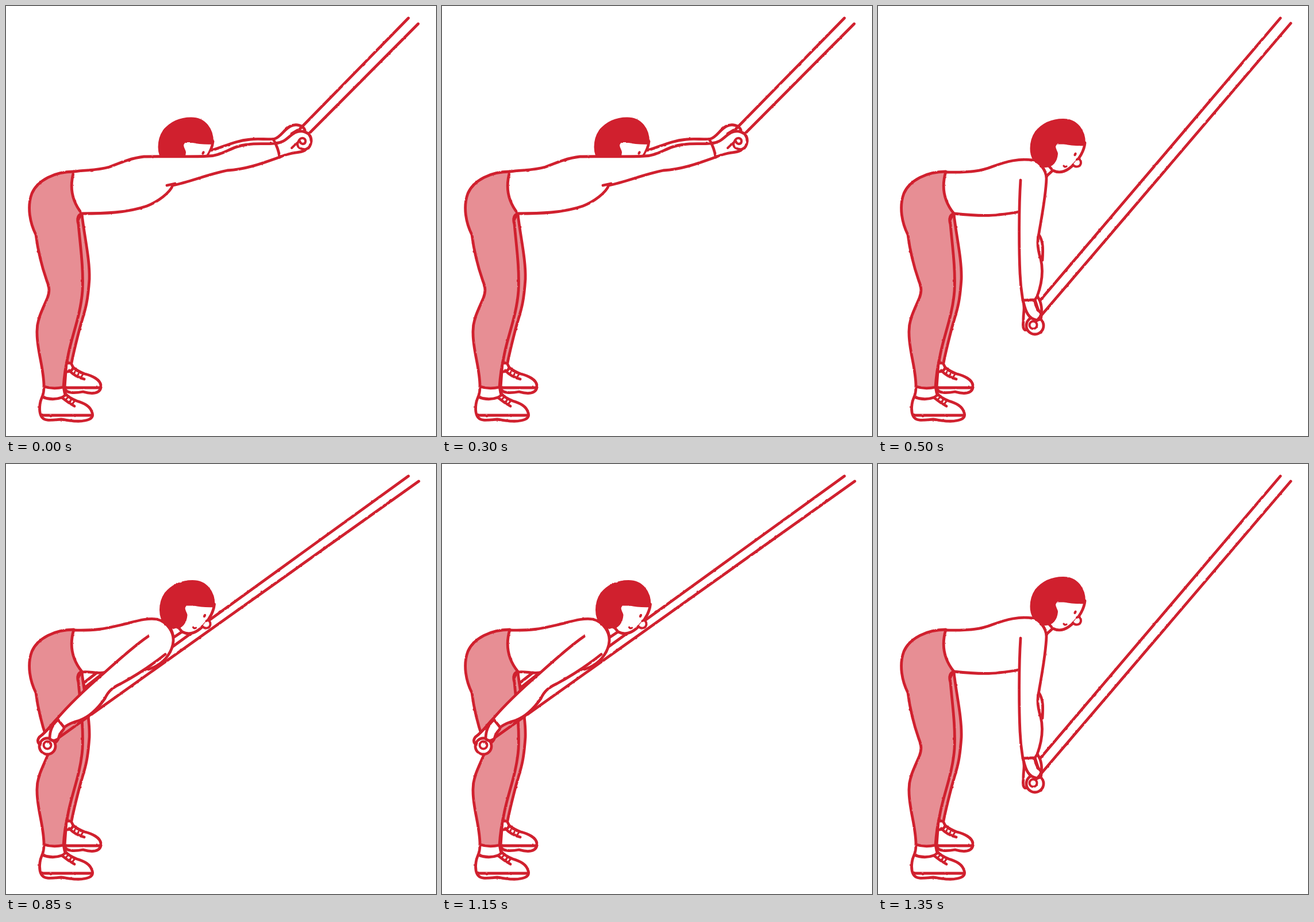
These frames come from a looping animation (748x748 px, 1.7 s). An HTML page:

```html
<!DOCTYPE html>
<html lang="en">
<head>
<meta charset="utf-8">
<title>Straight-arm cable pull</title>
<style>
  html, body { margin: 0; width: 100%; height: 100%; overflow: hidden; background: #fff; }
  svg { display: block; width: 100vw; height: 100vh; }
  .ink { fill: none; stroke: #d0202e; stroke-width: 4.8; stroke-linecap: round; stroke-linejoin: round; }
  .white { fill: #fff; }
  .pink { fill: #e78e94; }
  .red { fill: #d0202e; }
  .thin { stroke-width: 3.2; }
  .fine { stroke-width: 4; }
  .pose { visibility: hidden; }
  .pose.on { visibility: visible; }
</style>
</head>
<body>
<svg viewBox="0 0 748 748">
  <defs>
    <!-- slightly uneven, hand-inked edges -->
    <filter id="rough" filterUnits="userSpaceOnUse" x="0" y="0" width="748" height="748" color-interpolation-filters="sRGB">
      <feTurbulence type="fractalNoise" baseFrequency=".12" numOctaves="2" seed="4"/>
      <feDisplacementMap in="SourceGraphic" scale="2" xChannelSelector="R" yChannelSelector="G"/>
    </filter>
    <g id="head">
      <path class="white" d="M360 238C358 258 342 276 332 283C322 290 312 290 304 286L290 270L310 238Z"/>
      <path class="red" stroke-width="2" d="M275 272C262 262 263 235 274 219C288 202 306 197 322 197C346 197 361 216 360 242Q340 243 323 239C319 232 309 235 308 244C308 250 312 253 312 257C311 270 304 280 291 280C284 280 278 276 275 272Z"/>
      <path class="white fine" d="M346 267C350 264 353 268 353 273C352 281 342 281 339 276"/>
      <path class="thin" d="M323 278Q325 281 328 279"/>
      <ellipse class="red" cx="343" cy="258" rx="1.2" ry="2.4" stroke-width="2" transform="rotate(25 343 258)"/>
    </g>
  </defs>

  <g class="ink" filter="url(#rough)">
    <g id="legs">
      <path class="white" d="M105 622L104 636L102 664C103 675 122 673 134 671C148 675 166 676 165 660C164 650 150 643 137 640Q126 636 117 629L113 621"/>
      <path d="M102 664H165M104 636Q114 637 117 629M110 634Q120 645 136 649"/>
      <path class="thin" d="M118 640L122 633M124 644L128 636M130 647L134 640"/>
      <path class="pink" d="M132 362C136 400 146 440 145 475C142 520 137 530 129 558C122 585 118 600 114 621L106 621L118 500L126 370Z"/>
      <path class="white" d="M66 662Q66 672 63 680C58 690 57 705 61 713C66 724 82 720 96 719C112 721 124 724 138 721C149 719 152 714 150 708C147 696 136 691 123 687Q108 681 102 673L100 662"/>
      <path d="M61 712H150M63 680Q80 687 97 681Q104 678 103 673M97 681Q108 690 119 696"/>
      <path class="thin" d="M103 686L109 679M109 690L115 683M115 693L120 686"/>
      <path class="pink" d="M118 288C85 288 55 303 45 326C36 350 42 378 52 398C56 430 63 455 71 478C76 490 76 497 72 508C60 535 53 548 54 570C54 600 66 630 66 662Q82 667 100 663C101 645 104 625 108 608C114 575 130 538 133 495C135 455 129 415 126 380C123 370 125 363 132 361C115 340 110 315 118 288Z"/>
    </g>

    <g class="pose">
      <use href="#head" y="-2.5"/>
      <path class="white" d="M357 251C380 245 395 235 425 232C440 230 455 233 467 231C478 228 483 215 495 209C505 204 517 208 520 216L500 240L420 250L352 261Z" stroke="none"/>
      <path d="M357 251C380 245 395 235 425 232C440 230 455 233 467 231C478 228 483 215 495 209C505 204 517 208 520 216M497 222L507 216"/>
      <path d="M700 21L511 214M717 31L524 225"/>
      <path class="white" d="M468 239C485 238 490 228 500 222C512 214 531 218 531 235C530 244 526 248 522 249C518 255 505 254 494 257Q484 259 476 263"/>
      <path class="fine" d="M522 249C514 250 504 246 508 237C510 231 514 229 517 230C523 232 522 240 516 240Q512 239 511 235M508 237Q503 241 497 247"/>
      <path class="white" d="M118 288C140 285 160 286 180 280C200 272 220 264 240 262C270 261 320 263 352 261C380 260 390 244 420 241C440 238 455 241 468 239L466 234Q474 248 476 263C450 272 420 284 385 286C350 293 320 306 290 312C285 325 265 340 245 348C210 360 170 361 132 361"/>
      <path d="M280 312L294 309"/>
    </g>

    <g class="pose">
      <path d="M700 21L277 518"/>
      <use href="#head"/>
      <path d="M285 279Q291 287 292 297L303 287M280 398C288 410 287 425 286 442"/>
      <path class="white" d="M277 505C285 515 286 530 283 542L273 511"/>
      <path class="white" d="M252 512C257 525 252 533 253 548C251 560 254 567 261 562L275 546L273 511Z"/>
      <circle class="white" cx="273" cy="556" r="15"/>
      <path class="white" d="M253 515C257 532 262 544 275 546C285 548 287 538 279 529Q273 521 273 511"/>
      <path d="M718 30L274 550"/>
      <circle class="white fine" cx="270" cy="555" r="6.5"/>
      <path class="white" d="M118 289C160 290 180 287 200 279C225 270 245 265 268 268C280 270 293 285 293 300C292 330 285 365 280 395C276 410 278 425 283 440C288 460 286 480 277 505L273 511L252 512C250 500 248 490 247 465C245 420 245 350 248 303"/>
      <path d="M132 361C160 364 190 366 210 363Q230 361 245 358"/>
    </g>

    <g class="pose">
      <path d="M700 21L255 343M718 30L75 488M135 381L158 363M137 389L170 363"/>
      <path d="M132 362C145 360 155 365 170 363"/>
      <use href="#head" x="2.5" y="6"/>
      <path d="M285 284Q290 292 291 302L306 292"/>
      <path class="white" d="M89 443C78 454 72 465 58 475C53 482 56 490 62 485L80 488Q90 484 92 475C94 465 102 463 101 458"/>
      <circle class="white" cx="72" cy="491" r="14"/>
      <path class="white" d="M89 446C78 456 76 468 76 478Q82 484 89 479"/>
      <circle class="white fine" cx="72" cy="489" r="6.5"/>
      <path class="white" d="M118 289C155 290 170 287 200 280C225 274 245 267 262 270C280 274 292 292 291 308C290 325 278 342 262 351Q252 357 243 358"/>
      <path class="white" d="M277 331C262 343 235 363 200 382C185 389 178 395 172 408C160 425 145 440 128 446Q112 450 101 458L89 443C110 418 140 390 170 364C200 337 225 315 247 300"/>
    </g>
  </g>
</svg>
<script>
  const poses = [...document.querySelectorAll(".pose")];
  const schedule = [
    { until: 500, pose: 0 },
    { until: 850, pose: 1 },
    { until: 1350, pose: 2 },
    { until: 1700, pose: 1 },
  ];
  const loop = 1700;

  function draw() {
    const time = performance.now() % loop;
    const { pose } = schedule.find(step => time < step.until);
    poses.forEach((group, i) => group.classList.toggle("on", i === pose));
    requestAnimationFrame(draw);
  }
  draw();
</script>
</body>
</html>
```
